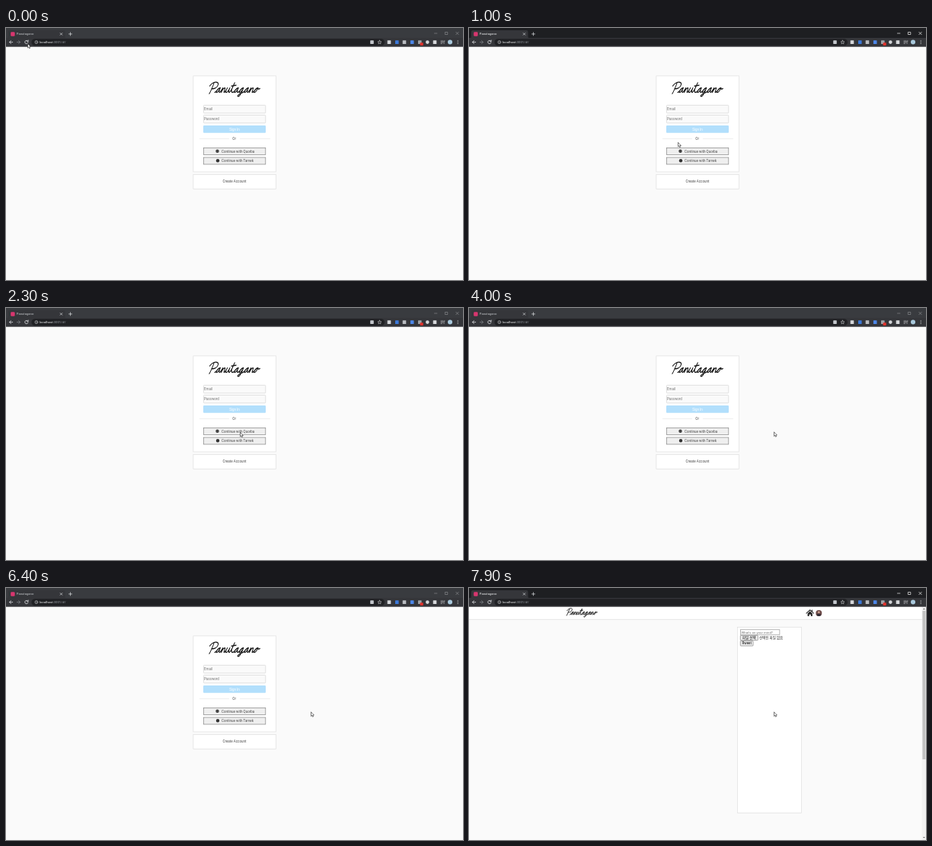
These frames come from a looping animation (600 by 331 pixels, 8 s). An HTML page:

```html
<!DOCTYPE html>
<html lang="en">
<head>
<meta charset="utf-8">
<title>Panutagano</title>
<style>
html, body { margin: 0; width: 100%; height: 100%; overflow: hidden; background: #fafafa; }
svg { display: block; width: 600px; height: 331px; font: 4.5px Roboto, "Noto Sans CJK KR", "Noto Sans CJK", sans-serif; }
.mid { text-anchor: middle; }
.line { fill: none; stroke-linecap: round; stroke-linejoin: round; }
.card { fill: #fff; stroke: #dfdfdf; stroke-width: .7; }
.field { fill: #fafafa; stroke: #d4d4d4; stroke-width: .7; }
.btn { fill: #efefef; stroke: #858585; stroke-width: .7; }
.label { fill: #4b4b4b; }
.hint { fill: #757575; }
</style>
</head>
<body>
<svg viewBox="0 0 600 331">
  <defs>
    <path id="word" class="line" stroke="#111" stroke-width="1.6"/>
  </defs>
  <rect width="600" height="331" fill="#fafafa"/>

  <g id="login">
    <rect class="card" x="245.9" y="62.9" width="108.6" height="126"/>
    <use href="#word" transform="translate(266.5 85.5) skewX(-14) scale(.66 .85)"/>
    <rect class="field" x="259.4" y="101.4" width="81.4" height="10.4" rx="1"/>
    <rect class="field" x="259.4" y="114.4" width="81.4" height="10.4" rx="1"/>
    <text class="hint" x="260" y="108.2">Email</text>
    <text class="hint" x="260" y="121.2">Password</text>
    <rect x="259" y="128" width="82" height="9.8" rx="1" fill="#b2dffc"/>
    <text class="mid" x="300" y="134.5" fill="#fff">Sign In</text>
    <path d="M254 145.5h39M307 145.5h40" stroke="#e4e4e4" stroke-width=".6"/>
    <text class="mid label" x="299.6" y="147.1">Or</text>
    <rect class="btn" x="259.4" y="157.4" width="81.4" height="9"/>
    <rect class="btn" x="259.4" y="170" width="81.4" height="9"/>
    <circle cx="277.5" cy="161.8" r="2.2" fill="#444"/>
    <circle cx="278" cy="174.3" r="2.2" fill="#333"/>
    <text class="label" x="283" y="163.5">Continue with Quorba</text>
    <text class="label" x="283" y="176">Continue with Tarnek</text>
    <rect class="card" x="245.9" y="192.4" width="108.6" height="19.2"/>
    <text class="mid label" x="300" y="203.4">Create Account</text>
  </g>

  <g id="home">
    <rect y="24" width="595" height="17.2" fill="#fff"/>
    <path d="M0 41.4h595" stroke="#dfdfdf" stroke-width=".7"/>
    <use href="#word" transform="translate(128 35.6) skewX(-14) scale(.4 .53)"/>
    <path d="M443 33.2l4.7-4.4 4.7 4.4M450.4 29v2" class="line" stroke="#222" stroke-width="1.1"/>
    <path d="M444.6 33.5l3.1-2.9 3.1 2.9v3.6h-2v-2.4h-2.2v2.4h-2z" fill="#222"/>
    <g id="face">
      <circle cx="459.3" cy="33" r="4" fill="#6d4b49"/>
      <path d="M456.4 35.7a3 2.6 0 0 1 5.8 0a4 4 0 0 1-5.8 0z" fill="#2e2a33"/>
      <circle cx="459.3" cy="31.8" r="1.5" fill="#c39b8b"/>
    </g>
    <rect class="card" x="352.4" y="51.4" width="84.2" height="244.2"/>
    <rect x="356.3" y="54.8" width="51.6" height="6.4" fill="#fff" stroke="#858585" stroke-width=".6"/>
    <text class="hint" x="357.4" y="59.6" font-size="4.4">What's on your mind?</text>
    <rect class="btn" x="356.3" y="62.3" width="23" height="6.4" rx=".6"/>
    <text class="mid" x="367.8" y="67.1">파일 선택</text>
    <text x="381" y="67.1" fill="#222">선택된 파일 없음</text>
    <rect class="btn" x="356.3" y="69.6" width="16.7" height="6.4" rx=".6"/>
    <text class="mid" x="364.7" y="74.4">Rweet</text>
    <rect x="594.6" y="24" width="5.4" height="307" fill="#f1f1f1"/>
    <rect x="595.4" y="30" width="4" height="195" fill="#c1c1c1"/>
    <path d="M596 28.2l1.4-1.6 1.4 1.6zM596 327l1.4 1.6 1.4-1.6z" fill="#606060"/>
  </g>

  <rect id="frame" width="600" height="14"/>
  <path d="M1 13.5q2 0 2-2V5q0-2 2-2h70.500q2 0 2 2v6.500q0 2 2 2z" fill="#35363a"/>
  <rect y="13" width="600" height="11.700" fill="#35363a"/>
  <rect x="33.500" y="14.300" width="463.500" height="9" rx="4.500" fill="#202124"/>
  <rect id="icon" x="6.200" y="5.300" width="5.400" height="5.400" rx="1.300" fill="#d9366f"/>
  <g id="spin">
    <circle cx="8.900" cy="8" r="1.700" fill="#d9366f"/>
    <path d="M8.900 5.200a2.800 2.800 0 1 1-2.800 2.800" class="line" stroke="#9db8e8" stroke-width=".7"/>
  </g>
  <text id="title" x="13.800" y="9.400" font-size="4.200">Panutagano</text>
  <path d="M71.200 6.600l2.600 2.600m0-2.600l-2.600 2.600M82.500 7.900h4M84.500 5.900v4" class="line" stroke="#dcdee1" stroke-width=".7"/>
  <path id="controls" d="M562.500 7h3.400M576.800 5.500h3v3h-3zM590.800 5.300l3.400 3.400m0-3.400l-3.400 3.400" class="line" stroke="#fff" stroke-width=".65"/>

  <g class="line" stroke="#dcdee1" stroke-width=".8">
    <path d="M8.700 18.600H4.500l2-2m-2 2l2 2"/>
    <path d="M14.400 18.600h4.200l-2-2m2 2l-2 2" stroke="#7c7f83"/>
    <path id="reload" d="M28.700 17.200a2.200 2.200 0 1 0 .4 1.800M29.200 16v1.700h-1.700"/>
    <path id="stop" d="M25.200 16.900l3.400 3.400m0-3.400l-3.400 3.400"/>
    <path d="M41.900 18.600a2 2 0 1 1-4 0a2 2 0 1 1 4 0M39.900 18.500v1.100M39.900 17.500v.1" stroke-width=".5"/>
    <path d="M490.500 16.200l.7 1.700 1.800.1-1.400 1.200.5 1.800-1.600-1-1.600 1 .5-1.800-1.400-1.200 1.800-.1z" stroke-width=".5"/>
    <path d="M571 17h3M571 18.700h2.500M571 20.300h1.500M575 20.500v-3.500h1" stroke-width=".6"/>
    <path d="M593.200 16.700v.1M593.200 18.600v.1M593.200 20.500v.1" stroke-width="1"/>
  </g>
  <text x="44" y="20.200" font-size="4.300" fill="#9aa0a6"><tspan fill="#f1f3f4">localhost</tspan>:3001/#/</text>
  <rect id="translate" x="478.200" y="16.300" width="4.600" height="4.600" rx=".6" fill="#c3c7cc"/>
  <g id="tools"></g>

  <path id="cursor" d="M0 0v5.600l1.300-1.100.8 1.900.9-.4-.8-1.800h1.700z" fill="#fff" stroke="#111" stroke-width=".55"/>
</svg>
<script>
const LOOP = 8000, STEP = 100;
const $ = id => document.getElementById(id);
const show = (id, on) => $(id).setAttribute('visibility', on ? 'visible' : 'hidden');

// Script lettering: each glyph starts and ends on the baseline.
const bowl = 'c3-1 5-7 9-7c-4-1-8 7-5 7c2 0 5-5 5-7';
const tail = 'c-1 4-1 7 1 7';
const glyphs = {
  P: 'm5-15c-1 6-2 11-4 16m-3-12c4-7 16-8 16-2c0 5-6 7-11 6m8 6',
  a: bowl + tail,
  n: 'c2-1 3-5 4-7l-1 7c1-4 3-7 5-7c2 0-1 7 1 7',
  u: 'c2-1 3-4 4-7c-2 4-2 7 0 7c2 0 4-4 5-7' + tail,
  t: 'c3-2 5-10 6-15c-3 8-4 15 1 15m-6-10l9-1m-3 11',
  g: bowl + 'c-1 8-3 13-6 13c-3 0-2-3 7-6',
  o: bowl + 'c0 2 2 2 4 1'
};
$('word').setAttribute('d', 'M0 0' + [...'Panutagano'].map(c => glyphs[c]).join(''));

// Toolbar buttons: x, colour, round
const tools = [
  [503, '#d5d7da'], [513.3, '#3b78d8'], [523, '#b9bcc0'], [533.2, '#4c86e8'], [543.3, '#9da1a6'],
  [553.3, '#d5d7da', 1], [563, '#d5d7da'], [583, '#a9c9dc', 1]
];
$('tools').innerHTML = tools.map(([x, fill, round]) => {
  const r = x > 580 ? 3 : 2.3;
  return `<rect x="${x - r}" y="${18.6 - r}" width="${2 * r}" height="${2 * r}" rx="${round ? r : .5}" fill="${fill}"/>`;
}).join('') + '<rect x="543.6" y="19.3" width="4.200" height="3.600" rx=".7" fill="#e0322b"/>';

// Pointer: time, x, y
const path = [
  [0, 28.5, 20.5], [100, 28.5, 20.5], [800, 274.5, 150], [1000, 274.5, 150.300],
  [1800, 309, 167], [2000, 307.500, 163.300], [2300, 307.500, 163.300],
  [3300, 400.500, 162.800], [LOOP, 400.500, 162.800]
];
const ease = p => p * p * (3 - 2 * p);

function pointer(t) {
  const i = path.findIndex(k => k[0] > t);
  const [t0, x0, y0] = path[i - 1], [t1, x1, y1] = path[i];
  const p = ease((t - t0) / (t1 - t0));
  return [x0 + (x1 - x0) * p, y0 + (y1 - y0) * p];
}

function draw(ms) {
  const t = Math.floor(ms % LOOP / STEP) * STEP;
  const active = t >= 100 && t < 2200 || t >= 7500;
  const loading = t >= 200 && t < 1000;
  const home = t >= 7600;
  $('frame').setAttribute('fill', active ? '#1e1f22' : '#393b3f');
  $('title').setAttribute('fill', active ? '#f1f3f4' : '#c4c7ca');
  $('controls').setAttribute('opacity', active ? 1 : .4);
  show('login', !home);
  show('home', home);
  show('face', t >= 7700);
  show('icon', !loading);
  show('spin', loading);
  show('reload', !loading);
  show('stop', loading);
  show('translate', !loading);
  $('spin').setAttribute('transform', `rotate(${t * .36} 8.9 8)`);
  $('cursor').setAttribute('transform', `translate(${pointer(t)})`);
}

const start = performance.now();
function tick() {
  draw(performance.now() - start);
  requestAnimationFrame(tick);
}
tick();
</script>
</body>
</html>
```
